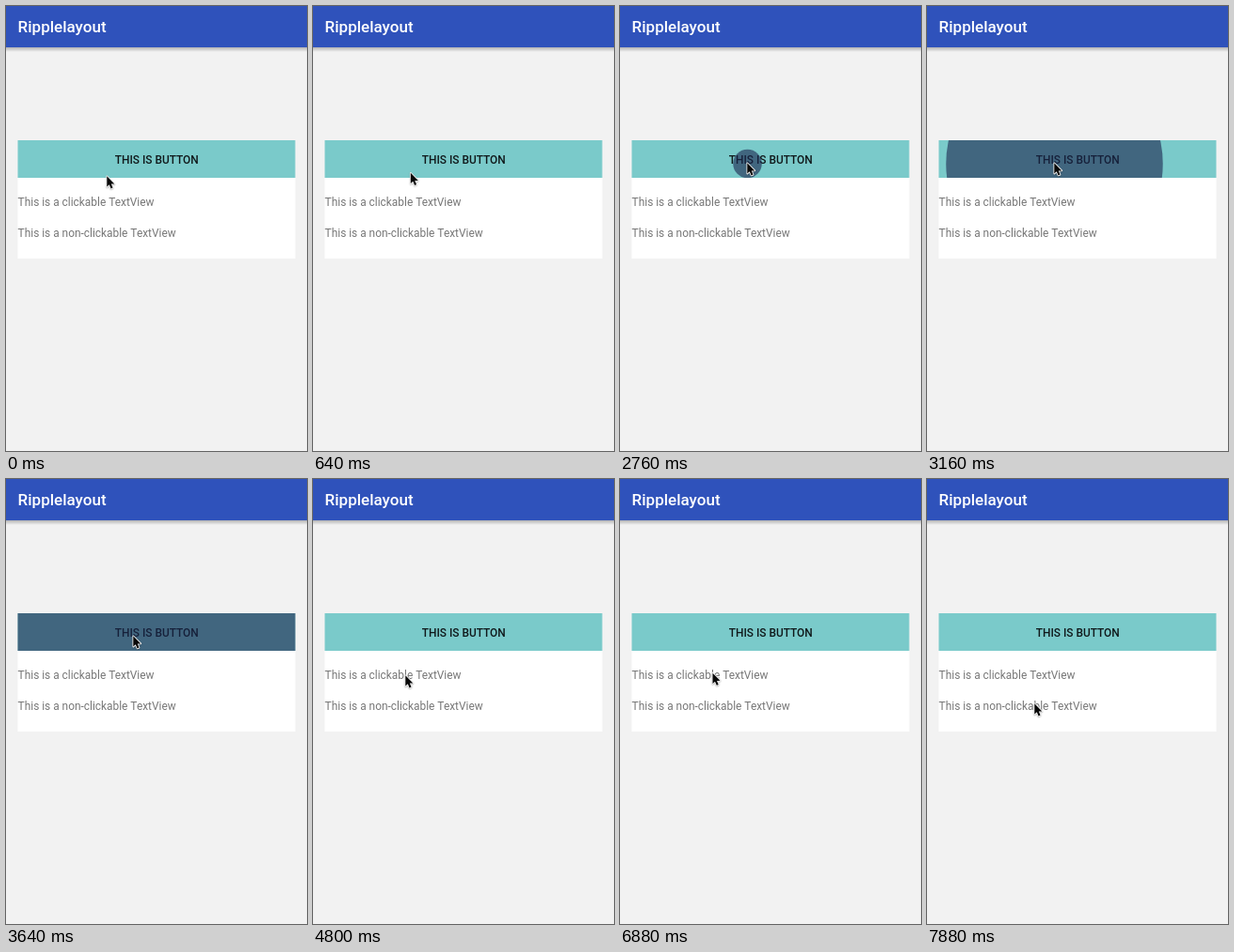
An HTML page with a canvas that plays this animation: 320 by 474 pixels, repeating every 8000 ms.

```html
<!DOCTYPE html>
<html lang="en">
<head>
<meta charset="utf-8">
<title>Ripplelayout</title>
<style>
html, body { margin: 0; width: 100%; height: 100%; overflow: hidden; background: #f2f2f2; }
canvas { display: block; width: 320px; height: 474px; }
</style>
</head>
<body>
<canvas id="stage"></canvas>
<script>
const LOOP = 8000, W = 320, H = 474;
const canvas = document.getElementById('stage');
const ctx = canvas.getContext('2d');
const dpr = window.devicePixelRatio || 1;
canvas.width = W * dpr;
canvas.height = H * dpr;

const button = { x: 12.5, y: 143, w: 295, h: 40 };
const label = { x: 12.5, y: 200, w: 295, h: 18 };
const ripples = [
  { box: button, x: 135.5, y: 168, start: 2700, release: 3950, fade: 280 },
  { box: label, x: 98.5, y: 208, start: 5790, release: 6600, fade: 180 }
];
const SPEED = 0.25; // px per ms

// Pointer tip: time, x, y
const path = [
  [0, 107, 181], [300, 107, 181], [1300, 94, 168], [1740, 94, 168],
  [1980, 84, 168], [2500, 135, 167], [4200, 135, 167], [4720, 98, 209],
  [4860, 98, 209], [5020, 98, 206], [6840, 98, 206], [7480, 114, 239], [LOOP, 114, 239]
];

const clamp = v => Math.max(0, Math.min(1, v));
const ease = v => v * v * (3 - 2 * v);

function pointerAt(t) {
  const i = path.findIndex(p => p[0] > t);
  const [t0, x0, y0] = path[i - 1], [t1, x1, y1] = path[i];
  const k = ease((t - t0) / (t1 - t0));
  return [x0 + (x1 - x0) * k, y0 + (y1 - y0) * k];
}

function rect(color, x, y, w, h) {
  ctx.fillStyle = color;
  ctx.fillRect(x, y, w, h);
}

function text(str, x, y, size, color, weight = 400, align = 'left') {
  ctx.font = `${weight} ${size}px Roboto, sans-serif`;
  ctx.textAlign = align;
  ctx.fillStyle = color;
  ctx.fillText(str, x, y);
}

function drawHeader() {
  const shadow = ctx.createLinearGradient(0, 44, 0, 49);
  shadow.addColorStop(0, 'rgba(0,0,0,0.26)');
  shadow.addColorStop(1, 'rgba(0,0,0,0)');
  rect(shadow, 0, 44, W, 5);
  rect('#2f52bb', 0, 0, W, 44);
  text('Ripplelayout', 12.6, 28, 17, '#fff', 500);
}

function drawCard() {
  rect('#fff', 12.5, 183, 295, 86);
  rect('#7acaca', button.x, button.y, button.w, button.h);
  text('THIS IS BUTTON', 160.2, 167.5, 11.9, '#10191b', 500, 'center');
  text('This is a clickable TextView', 12.6, 213, 11.9, '#777');
  text('This is a non-clickable TextView', 12.6, 245.5, 11.9, '#777');
}

function drawRipple(r, t) {
  const alpha = 1 - clamp((t - r.release) / r.fade);
  if (t <= r.start || alpha === 0) return;
  const { x, y, w, h } = r.box;
  ctx.save();
  ctx.beginPath();
  ctx.rect(x, y, w, h);
  ctx.clip();
  ctx.globalAlpha = 0.6 * alpha;
  ctx.fillStyle = '#1b254f';
  ctx.beginPath();
  ctx.arc(r.x, r.y, (t - r.start) * SPEED, 0, Math.PI * 2);
  ctx.fill();
  ctx.restore();
}

function drawPointer(x, y) {
  ctx.save();
  ctx.translate(x, y);
  ctx.beginPath();
  ctx.moveTo(0.3, 0.3);
  for (const [px, py] of [[0.3, 11.6], [2.8, 9.3], [4.6, 13.4], [6.5, 12.6], [4.8, 8.6], [8.3, 8.4]]) {
    ctx.lineTo(px, py);
  }
  ctx.closePath();
  ctx.lineJoin = 'round';
  ctx.lineWidth = 1.7;
  ctx.strokeStyle = '#f4f4f4';
  ctx.shadowColor = 'rgba(0,0,0,0.3)';
  ctx.shadowBlur = 1.5 * dpr;
  ctx.shadowOffsetY = 0.7 * dpr;
  ctx.stroke();
  ctx.shadowColor = 'transparent';
  ctx.fillStyle = '#080808';
  ctx.fill();
  ctx.restore();
}

function draw(t) {
  ctx.setTransform(dpr, 0, 0, dpr, 0, 0);
  rect('#f2f2f2', 0, 0, W, H);
  drawHeader();
  drawCard();
  ripples.forEach(r => drawRipple(r, t));
  drawPointer(...pointerAt(t));
}

const began = performance.now();
function tick() {
  draw((performance.now() - began) % LOOP);
  requestAnimationFrame(tick);
}
tick();
</script>
</body>
</html>
```
